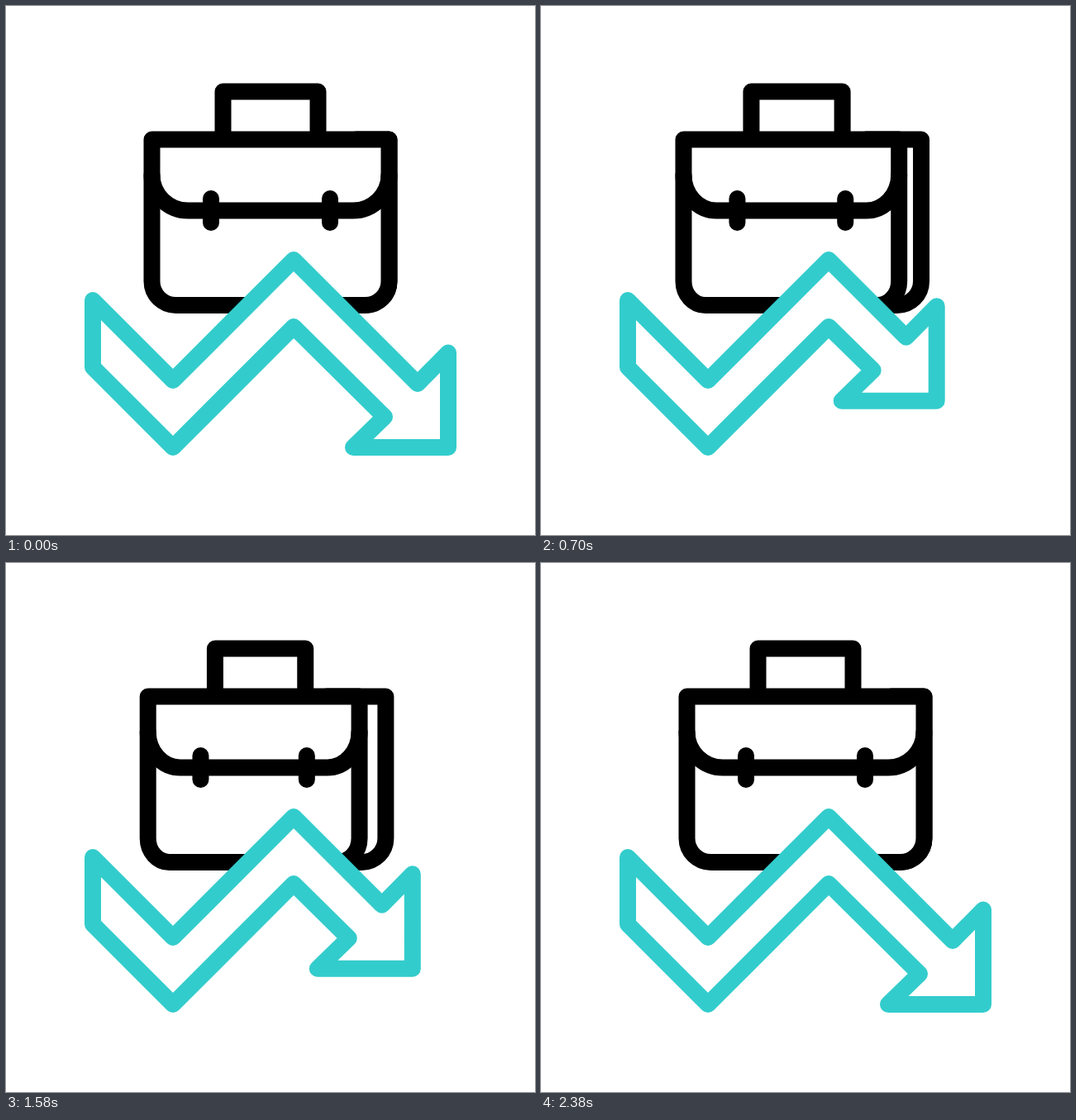
Animation of 640x640 px, one loop 2.4 s. Source, as an HTML page:

```html
<!DOCTYPE html>
<html lang="en">
<head>
<meta charset="utf-8">
<title>Briefcase and falling arrow</title>
<style>
  html, body { margin: 0; width: 100%; height: 100%; overflow: hidden; background: #fff; }
  svg { display: block; width: 100%; height: 100%; }
</style>
</head>
<body>
<svg viewBox="0 0 640 640" fill="#fff" stroke="#000" stroke-width="20" stroke-linecap="round" stroke-linejoin="round">
  <path id="handle"/>
  <path id="back"/>
  <path id="front"/>
  <path id="flap" fill="none"/>
  <path id="clasps" fill="none"/>
  <path id="arrow" stroke="#33cccc"/>
</svg>
<script>
  const LOOP = 2400, STEP = 20, END = 2380;
  const TOP = 161.5, BOTTOM = 362, LEFT = 176.5, RIGHT = 463.5;

  // Arrow retreat against time to the nearest rest
  const RETREAT = [[0, 0], [100, 5], [220, 18], [320, 31.5], [480, 56.3], [540, 71.5], [600, 86]];

  const set = (id, d) => document.getElementById(id).setAttribute('d', d);
  const smooth = u => u * u * (3 - 2 * u);

  function slope(pts, i) {
    if (i === 0) return 0;
    const a = pts[i - 1], b = pts[Math.min(i + 1, pts.length - 1)];
    return (b[1] - a[1]) / (b[0] - a[0]);
  }

  function spline(pts, x) {
    let i = 0;
    while (i < pts.length - 2 && x > pts[i + 1][0]) i++;
    const [x0, y0] = pts[i], [x1, y1] = pts[i + 1];
    const w = x1 - x0, u = (x - x0) / w, v = 1 - u;
    return y0 + (y1 - y0) * smooth(u)
      + w * u * v * (v * slope(pts, i) - u * slope(pts, i + 1));
  }

  function drawCase(p) {
    // The front panel narrows as the case turns
    const k = 1 - 0.145 * p;
    const fx = x => LEFT - 6.4 * p + (x - LEFT) * k;
    const l = fx(LEFT), r = fx(RIGHT), b = RIGHT - 5.5 * p;
    const corner = 29 * k, curve = 43.5 * k;
    const hl = 262.5 - 12.8 * p, hr = 377.5 - 20.4 * p;

    set('handle', `M${hl} ${TOP}V103.5H${hr}V${TOP}`);
    set('back', `M${r - 40} ${TOP}H${b}V333A29 29 0 0 1 ${b - 29} ${BOTTOM}H${r - 40}Z`);
    set('front', `M${l} ${TOP}H${r}V333A${corner} 29 0 0 1 ${r - corner} ${BOTTOM}` +
      `H${l + corner}A${corner} 29 0 0 1 ${l} 333Z`);
    set('flap', `M${l} 204A${curve} 43.5 0 0 0 ${l + curve} 247.5` +
      `H${r - curve}A${curve} 43.5 0 0 0 ${r} 204`);
    set('clasps', [248, 392].map(x => `M${fx(x)} 233V262`).join(''));
  }

  function drawArrow(d) {
    const head = [[498, 457], [535, 419.5], [535, 534], [420, 534], [458, 497]]
      .map(([x, y]) => `L${x - d} ${y - d}`).join('');
    set('arrow', `M105 356L202 453L348 307${head}L348 388L202 534L105 437Z`);
  }

  function draw(ms) {
    const t = Math.floor((ms % LOOP) / STEP + 1e-6) * STEP;
    drawCase(smooth(1 - Math.abs(t / (END / 2) - 1)));
    drawArrow(spline(RETREAT, Math.min(t, Math.abs(t - 1180), END - t)));
  }

  let start;
  function tick(now) {
    if (start === undefined) start = now;
    draw(now - start);
    requestAnimationFrame(tick);
  }
  draw(0);
  requestAnimationFrame(tick);
</script>
</body>
</html>
```
